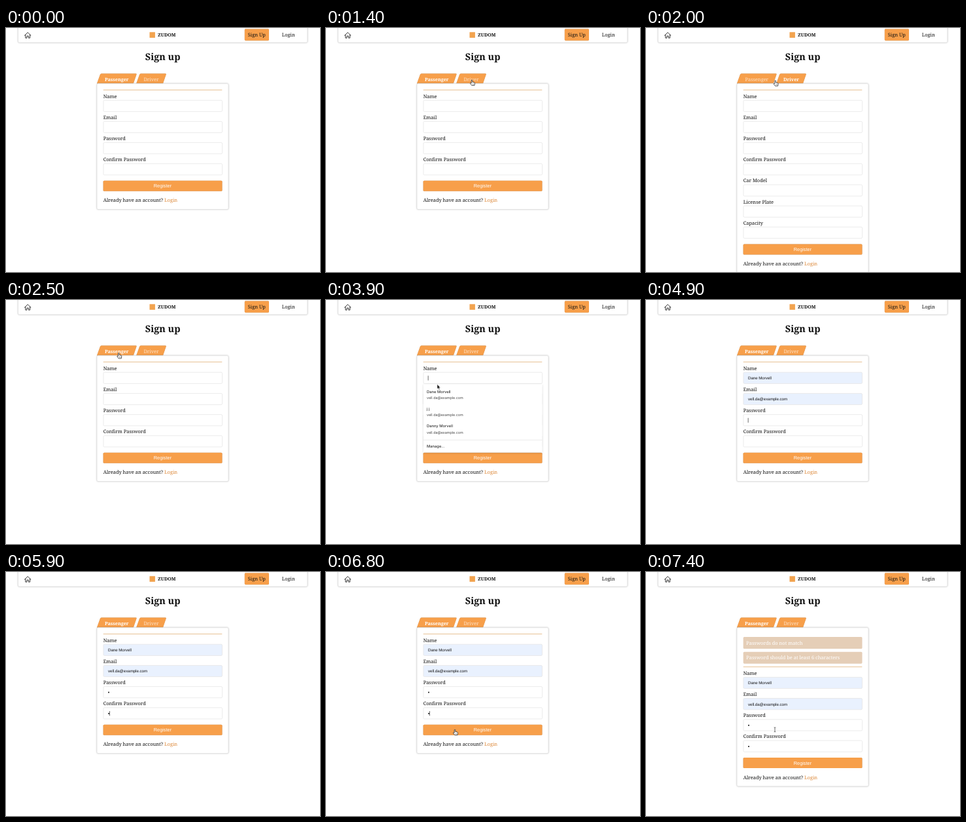
An HTML page that plays this animation: 480 by 372 pixels, repeating every 8000 ms.

```html
<!DOCTYPE html>
<html lang="en">
<head>
<meta charset="utf-8">
<title>Sign up</title>
<style>
  html, body { margin: 0; width: 100%; height: 100%; overflow: hidden; background: #fff; }
  svg { display: block; width: 480px; height: 372px; text-rendering: geometricPrecision; }
  text { font: 7.45px "Noto Serif", serif; fill: #111; white-space: pre; }
  .bold { font-weight: 700; font-size: 7.2px; }
  .title { font-weight: 700; font-size: 14.4px; }
  .white { fill: #fff; }
  .dim { fill: #fde3cb; }
  .mid { text-anchor: middle; }
  .link { fill: #dd8a3c; }
  .value { font: 6.1px "Liberation Sans", Arial, sans-serif; }
  .button { font: 7.3px "Liberation Sans", Arial, sans-serif; fill: #fff; }
  .person { font: 500 5.8px Inter, sans-serif; fill: #333; }
  .mail { font: 5.4px Inter, sans-serif; fill: #444; }
  .preview { font: 5.9px Inter, sans-serif; fill: #222; }
  .panel { fill: #fff; stroke: #dcdcdc; stroke-width: .7; filter: drop-shadow(0 .6px 1px rgba(0,0,0,.2)); }
  .orange { fill: #f79f4a; }
  .raised { filter: drop-shadow(0 .5px .6px rgba(0,0,0,.3)); }
  .list { fill: #fff; filter: drop-shadow(0 1px 1.5px rgba(0,0,0,.16)); }
</style>
</head>
<body>
<svg viewBox="0 0 480 372">
  <rect class="panel" x="18.4" y="-6" width="442.4" height="28.2" rx="2"/>
  <path d="M28.4 11.4 33.2 6.8 38 11.4M29.8 10.4V15.2H32V12.2H34.4V15.2H36.6V10.4"
        fill="none" stroke="#222" stroke-width=".9" stroke-linejoin="round" stroke-linecap="round"/>
  <rect x="219.5" y="6.3" width="8.4" height="8.6" fill="#f2a34f"/>
  <text class="bold" x="232" y="13.3" style="font-size:7px">ZUDOM</text>
  <rect class="orange raised" x="364.8" y="1.6" width="37.2" height="17.6" rx="1.4"/>
  <text class="mid" x="383.3" y="13.4">Sign Up</text>
  <text class="mid" x="431.7" y="13.4">Login</text>
  <text class="title mid" x="239.6" y="49.3">Sign up</text>
  <g id="scene"></g>
</svg>
<script>
const LOOP = 8000, TICK = 100;
const NAME = 'Dane Morvell', MAIL = 'vell.da@example.com';
const PEOPLE = [NAME, 'j j', 'Danny Morvell'];
const BASIC = ['Name', 'Email', 'Password', 'Confirm Password'];
const DRIVER = [...BASIC, 'Car Model', 'License Plate', 'Capacity'];
const ALERTS = ['Passwords do not match', 'Password should be at least 6 characters'];
const scene = document.getElementById('scene');

const text = (x, y, str, cls = '') => `<text x="${x}" y="${y}" class="${cls}">${str}</text>`;
const rect = (x, y, w, h, extra = '') => `<rect x="${x}" y="${y}" width="${w}" height="${h}" ${extra}/>`;
const caret = (x, y) => rect(x, y - 3.6, .6, 7.2, 'fill="#111"');

// Pointer legs: start, end, from, to
const LEGS = [
  [800, 1400, [384, 12], [223, 79]],
  [1800, 2200, [223, 79], [172.3, 80.5]],
  [2800, 3400, [172.3, 80.5], [170, 128.6]],
  [3900, 4100, [170, 128.6], [172, 147.5]],
  [6100, 6700, [172, 150], [197, 240]]
];

const POINTERS = {
  hand: '<path d="M-.8 .6Q0-.4 .8 .6V3.4L3 3.8Q4.6 4 4.5 5.6L4 8.6H-.2L-2.6 5.4Q-2.6 4.2-.8 5.2Z" fill="#fff" stroke="#222" stroke-width=".75" stroke-linejoin="round"/><path d="M1.2 5.6V7.4M2.7 5.7V7.4" stroke="#222" stroke-width=".45"/>',
  arrow: '<path d="M0 0V7L1.6 5.6 2.7 8.2 3.9 7.7 2.8 5.2H4.9Z" fill="#111" stroke="#fff" stroke-width=".5"/>',
  beam: '<path d="M-1.3-3.2Q0-3.2 0-2.4Q0-3.2 1.3-3.2M0-2.4V3M-1.3 3.8Q0 3.8 0 3Q0 3.8 1.3 3.8" fill="none" stroke="#333" stroke-width=".7"/>'
};

function pointer(t) {
  if (t < 800 || (t >= 4900 && t < 6200)) return '';
  const [from, to, a, b] = LEGS.filter(leg => t >= leg[0]).pop();
  const p = Math.min(1, (t - from) / (to - from));
  const k = p * p * (3 - 2 * p);
  const [x, y] = a.map((v, i) => v + (b[i] - v) * k);
  let kind = 'arrow';
  if (t >= 7200) kind = 'beam';
  else if (t >= 6200) kind = y > 232 ? 'hand' : y % 32 > 14 && y % 32 < 31 ? 'beam' : 'arrow';
  else if (t >= 4400) kind = 'beam';
  else if (y > 69 && y < 85 || y < 19) kind = 'hand';
  else if (y > 110 && y < 127) kind = 'beam';
  return `<g transform="translate(${x} ${y})">${POINTERS[kind]}</g>`;
}

function tab(x, width, label, active) {
  const shape = `M${x + 5} 71.2Q${x + 5.6} 69.6 ${x + 7} 69.6H${x + width - 1.4}Q${x + width + .2} 69.6 ${x + width - .3} 71L${x + width - 5} 84.6H${x + .2}Z`;
  return `<path class="orange raised" d="${shape}"/>` +
    text(x + width / 2, 81.2, label, 'mid ' + (active ? 'bold white' : 'dim'));
}

function field(label, i, shift, t) {
  const y = 110.2 + i * 32.2 + shift;
  const filled = i < 2 && t >= 4300;
  const showing = filled || (i === 0 && t >= 4100);
  const fill = showing ? '#e9f1fe' : '#fff';
  let out = text(148.7, y - 3.6, label) +
    rect(148.9, y, 181.6, 17.2, `rx="1.6" fill="${fill}" stroke="#e2e2e2" stroke-width=".7"`);
  if (showing) out += text(156, y + 11, i ? MAIL : NAME, t < 4600 ? 'preview' : 'value');
  const typed = i === 2 ? 5500 : i === 3 ? 5900 : LOOP;
  if (t >= typed) out += `<circle cx="157" cy="${y + 9}" r="1" fill="#111"/>`;
  const focus = t < 3700 || t >= 7200 ? -1 : t < 4900 ? 0 : t < 5700 ? 2 : 3;
  if (i === focus && (i || t < 4100)) out += caret(t >= typed ? 158.4 : 155.8, y + 8.8);
  return out;
}

function suggestions(t) {
  if (t < 3700 || t >= 4400) return '';
  let out = rect(148.8, 128.4, 181.8, 104, 'class="list"');
  if (t >= 4100) out += rect(148.8, 133.4, 181.8, 22.4, 'fill="#eeeeee"');
  PEOPLE.forEach((name, i) => {
    const y = 141.6 + i * 26.3;
    out += text(154, y, name, 'person') + text(154, y + 9.4, MAIL, 'mail');
  });
  out += rect(148.8, 213, 181.8, .6, 'fill="#e2e2e2"') + text(154, 225.4, 'Manage...', 'person');
  const fade = Math.min(1, (t - 3600) / 200);
  return `<g opacity="${fade}">${out}</g>`;
}

function alerts(t) {
  const boxes = ALERTS.map((msg, i) => {
    const y = 99 + i * 22.7;
    return rect(148.7, y, 181.8, 18, 'rx="1.6" fill="#e5ceb7"') + text(153.3, y + 11.7, msg, 'white');
  });
  return `<g opacity="${Math.min(1, (t - 7100) / 300)}">${boxes.join('')}</g>`;
}

function draw(t) {
  const driver = t >= 1700 && t < 2500;
  const failed = t >= 7200;
  const shift = failed ? 50.2 : 0;
  const labels = driver ? DRIVER : BASIC;
  const foot = shift + (labels.length - 4) * 32.2;
  scene.innerHTML =
    tab(138.8, 61, 'Passenger', !driver) + tab(199, 46, 'Driver', driver) +
    rect(139, 84.8, 201, 191.8 + foot, 'class="panel" rx="2"') +
    (failed ? alerts(t) : '') +
    rect(148.7, 94.2 + shift, 181.6, .7, 'fill="#dda868"') +
    labels.map((label, i) => field(label, i, shift, t)).join('') +
    rect(148.6, 232.8 + foot, 181.9, 16, 'class="orange raised" rx="1.5"') +
    text(239.4, 243.4 + foot, 'Register', 'button mid') +
    `<text x="148.7" y="${265.4 + foot}">Already have an account? <tspan class="link">Login</tspan></text>` +
    suggestions(t) + pointer(t);
}

const start = performance.now();
let last = -1;
function frame() {
  const t = Math.floor((performance.now() - start) % LOOP / TICK) * TICK;
  if (t !== last) draw(last = t);
  requestAnimationFrame(frame);
}
frame();
</script>
</body>
</html>
```
